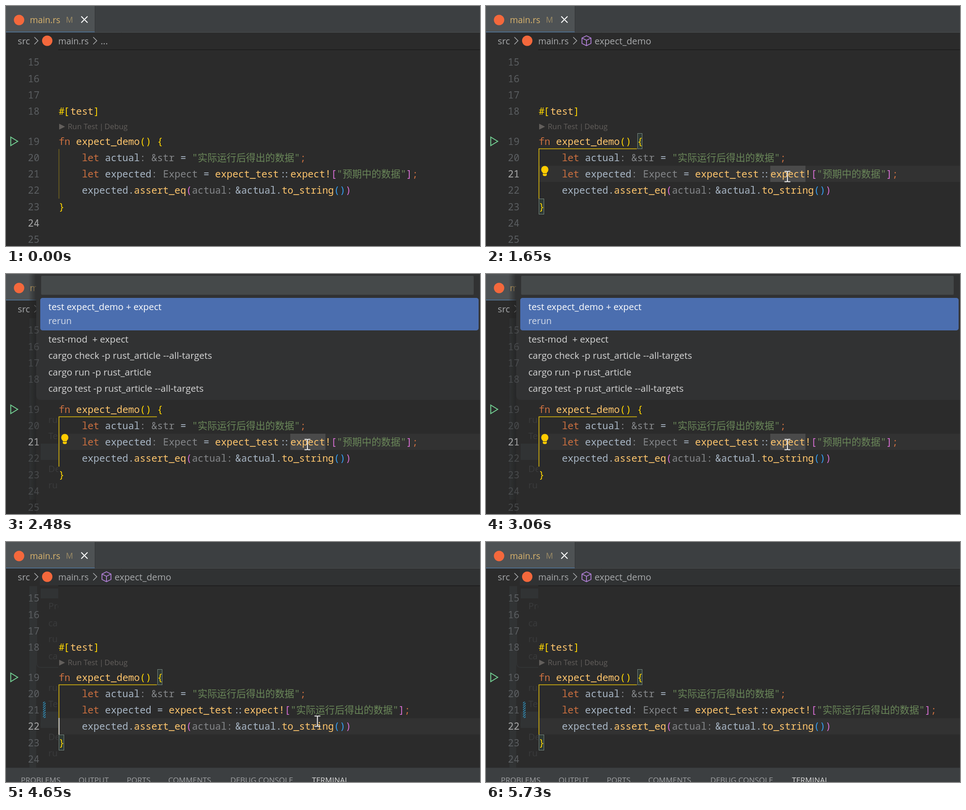
Recreate the animation shown at these times as an HTML page. Size 1052 by 532 pixels, loop 5830 ms.

```html
<!DOCTYPE html>
<html lang="zh-CN">
<head>
<meta charset="utf-8">
<title>Expect test demo</title>
<style>
html, body { margin: 0; width: 100%; height: 100%; overflow: hidden; background: #2b2b2b; }
svg { display: block; width: 100vw; height: 100vh; }
text { white-space: pre; }
.ui { font: 20.2px "Open Sans", "Noto Sans", sans-serif; fill: #d6d6d6; }
.code { font: 300 21.43px "Noto Sans Mono", "Noto Sans CJK SC", "Noto Sans CJK JP", "Noto Sans CJK", monospace; fill: #a9b7c6; }
.crumb { fill: #a9abad; }
.lens { font-size: 16.8px; fill: #635f5c; }
.tabs { font-size: 17px; fill: #a0a2a4; }
.runs { font-size: 20.6px; }
.line { fill: none; stroke-width: 2; }
.nums { fill: #5b5e61; }
.cur { fill: #a4a4a4; }
.k { fill: #cc7040; }
.f { fill: #ffc66d; }
.m { fill: #ffc66d; font-weight: 400; }
.h { fill: #85878a; }
.s { fill: #6a8759; }
.g { fill: #ffd700; }
.p { fill: #da70d6; }
.b { fill: #359ff4; }
.w { fill: #fff; }

/* each class shows its element during one part of the loop */
.before, .after, .crumbs0, .crumbs1, .row21, .row22, .bulb, .word, .caret21, .caret22,
.match, .cmds, .hover, .runs, .typing, .nums, .old, .fresh, .final,
.hatch, .panel, .trace, .hand, .beam { animation: 5830ms step-end infinite; }
.path { animation: path 5830ms linear infinite; }

.before { animation-name: before; }
.after { animation-name: after; }
.crumbs0 { animation-name: crumbs0; }
.crumbs1 { animation-name: crumbs1; }
.row21 { animation-name: row21; }
.row22 { animation-name: row22; }
.bulb { animation-name: bulb; }
.word { animation-name: word; }
.caret21 { animation-name: caret21; }
.caret22 { animation-name: caret22; }
.match { animation-name: match; }
.cmds { animation-name: cmds; }
.hover, .hand { animation-name: hover; }
.runs { animation-name: runs; }
.typing { animation-name: typing; }
.nums { animation-name: nums; }
.old { animation-name: old; }
.fresh { animation-name: fresh; }
.final { animation-name: final; }
.hatch { animation-name: hatch; }
.panel { animation-name: panel; }
.trace { animation-name: trace; }
.beam { animation-name: beam; }

@keyframes before { 0% { opacity: 1 } 18.52%, 100% { opacity: 0 } }
@keyframes after { 0% { opacity: 0 } 18.52%, 100% { opacity: 1 } }
@keyframes crumbs0 { 0% { opacity: 1 } 19.72%, 100% { opacity: 0 } }
@keyframes crumbs1 { 0% { opacity: 0 } 19.72%, 100% { opacity: 1 } }
@keyframes row21 { 0% { opacity: 0 } 18.52% { opacity: 1 } 71.69%, 100% { opacity: 0 } }
@keyframes row22 { 0% { opacity: 0 } 71.69%, 100% { opacity: 1 } }
@keyframes bulb { 0% { opacity: 0 } 23.67% { opacity: 1 } 71.69%, 100% { opacity: 0 } }
@keyframes word { 0% { opacity: 0 } 27.1% { opacity: 1 } 71.69%, 100% { opacity: 0 } }
@keyframes caret21 { 0% { opacity: 0 } 18.52% { opacity: 1 } 27.1% { opacity: 0 } 59% { opacity: 1 } 71.69%, 100% { opacity: 0 } }
@keyframes caret22 { 0% { opacity: 0 } 71.69% { opacity: 1 } 90.05%, 100% { opacity: 0 } }
@keyframes match { 0% { opacity: 0 } 18.52% { opacity: 1 } 32.24% { opacity: 0 } 59%, 100% { opacity: 1 } }
@keyframes cmds { 0% { opacity: 0 } 32.24% { opacity: 1 } 42.53%, 100% { opacity: 0 } }
@keyframes hover { 0% { opacity: 0 } 33.1% { opacity: 1 } 42.53%, 100% { opacity: 0 } }
@keyframes runs { 0% { opacity: 0 } 42.53% { opacity: 1 } 57.97%, 100% { opacity: 0 } }
@keyframes typing { 0% { opacity: 0 } 43.73% { opacity: 1 } 52.48%, 100% { opacity: 0 } }
@keyframes nums { 0% { opacity: 1 } 32.24% { opacity: .6 } 57.97%, 100% { opacity: 1 } }
@keyframes old { 0% { opacity: 1 } 71.69%, 100% { opacity: 0 } }
@keyframes fresh { 0% { opacity: 0 } 71.69% { opacity: 1 } 95.19%, 100% { opacity: 0 } }
@keyframes final { 0% { opacity: 0 } 95.19%, 100% { opacity: 1 } }
@keyframes hatch { 0% { opacity: 0 } 76.5%, 100% { opacity: 1 } }
@keyframes panel { 0% { opacity: 0 } 63.8%, 100% { opacity: 1 } }
@keyframes trace { 0% { opacity: 0 } 42.53%, 100% { opacity: 1 } }
@keyframes beam { 0% { opacity: 0 } 4.8% { opacity: 1 } 33.1% { opacity: 0 } 42.53% { opacity: 1 } 86.79%, 100% { opacity: 0 } }
@keyframes path {
  0%, 4.8% { transform: translate(264px, 524px) }
  8.23% { transform: translate(400px, 497px) }
  10.29% { transform: translate(491px, 480px) }
  11.32% { transform: translate(549px, 478px) }
  12.69% { transform: translate(640px, 425px) }
  13.89% { transform: translate(676px, 386px) }
  16.12%, 76.5% { transform: translate(669px, 378px) }
  79.76% { transform: translate(691px, 397px) }
  81.47% { transform: translate(704px, 418px) }
  84.04% { transform: translate(699px, 448px) }
  85.76% { transform: translate(667px, 479px) }
  86.79%, 100% { transform: translate(475px, 526px) }
}
</style>
</head>
<body>
<svg viewBox="0 0 1052 532" preserveAspectRatio="none">
<defs>
  <linearGradient id="shade">
    <stop stop-color="#222" stop-opacity="0"/>
    <stop offset="1" stop-color="#222" stop-opacity=".7"/>
  </linearGradient>
  <pattern id="stripes" width="6" height="5" patternUnits="userSpaceOnUse">
    <path d="M-1 6L7 0M-1 1L1 -.5M5 6.5L7 5" stroke="#2f86ad" stroke-width="2"/>
  </pattern>
  <clipPath id="strip"><path d="M52 98H116V500H52z"/></clipPath>
  <g id="gear" fill="none" stroke="#dcdfe6" stroke-width="2">
    <circle r="8.3"/>
    <circle r="10.4" stroke-width="3" stroke-dasharray="4.08"/>
    <circle r="3.2"/>
  </g>
</defs>

<rect width="1052" height="532" fill="#2b2b2b"/>

<!-- faint remains left of the code after the list closes -->
<g class="trace">
  <path d="M75 60H1052V96H75z" fill="#303233"/>
  <path d="M52 98H67V500H52zM77 103H116V125H77zM77 376H116V412H77z" fill="#313334"/>
  <path d="M68 98V268Q68 278 78 278H116" class="line" stroke="#313334"/>
  <g class="ui" style="fill:#3a3b3c" clip-path="url(#strip)">
    <text x="94" y="149">Preferences</text>
    <text x="94" y="187">cargo</text>
    <text x="94" y="222">rust</text>
    <text x="94" y="260">cargo</text>
    <text x="94" y="330">rust</text>
    <text x="94" y="366">Terminal</text>
    <text x="94" y="439">Developer</text>
    <text x="94" y="475">rust</text>
  </g>
</g>

<!-- tab bar and breadcrumbs -->
<rect width="1052" height="58" fill="#3c3f41"/>
<rect width="197" height="58" fill="#4e5254"/>
<path d="M0 58.5H1052" stroke="#4b4e50"/>
<path d="M0 57.5H197" stroke="#4a7fb5"/>
<path d="M197.5 0V58" stroke="#323436"/>
<path d="M116 97H1052" stroke="#1f1f1f" stroke-width="2"/>
<circle cx="29" cy="31" r="11.5" fill="#f4683c"/>
<circle cx="91.5" cy="77" r="11.5" fill="#f4683c"/>
<path d="M167 23L181 37M181 23L167 37" class="line" stroke="#fff"/>
<path d="M63 69L71 77L63 85M193.500 69L201.500 77L193.500 85" class="line" stroke="#a9abad" style="stroke-width:1.6"/>
<g class="ui">
  <text x="53" y="38" style="font-size:19.3px;fill:#d9b36c">main.rs</text>
  <text x="133" y="37" style="font-size:17.5px;fill:#9a8a66">M</text>
  <text x="26" y="85" class="crumb">src</text>
  <text x="116" y="85" class="crumb" style="font-size:19.3px">main.rs</text>
  <text x="210" y="85" class="crumb crumbs0">...</text>
  <g class="crumbs1">
    <path d="M223 66L233 71V83L223 88L213 83V71zM213 71L223 76L233 71M223 76V88" class="line" stroke="#b180d7" style="stroke-width:1.8"/>
    <text x="241" y="85" class="crumb">expect_demo</text>
  </g>
</g>

<!-- marks behind the code -->
<rect class="row21" x="117" y="354" width="935" height="36" fill="#323232"/>
<rect class="row22" x="117" y="390.500" width="935" height="36" fill="#323232"/>
<rect class="word" x="631" y="354" width="78" height="36" fill="#4a4a4a"/>
<g class="match" fill="#2f3a36" stroke="#788a82">
  <rect x="336.5" y="282.5" width="10" height="34"/>
  <rect x="117.5" y="427.5" width="11" height="34"/>
</g>
<path class="before line" d="M117.500 317V427" stroke="#675a20"/>
<path class="after line" d="M335 316.500H117.500V427" stroke="#e0bd0c" style="stroke-width:1.6"/>
<path d="M10.500 290.500L26 300L10.500 309.500z" class="line" stroke="#73d093"/>
<path d="M118 261L131 267.500L118 274z" fill="#635f5c"/>
<g class="ui">
  <text class="lens" x="137" y="273">Run Test</text>
  <text class="lens" x="207" y="273">|</text>
  <text class="lens" x="218.5" y="273">Debug</text>
</g>

<!-- code -->
<g class="code">
  <text x="117" y="241" class="g">#<tspan dx="-2">[</tspan><tspan class="f" dx="2">test</tspan>]</text>
  <text x="117" y="307.500"><tspan class="k">fn</tspan> <tspan class="f">expect_demo</tspan><tspan class="g">() {</tspan></text>
  <text x="168.4" y="343.500"><tspan class="k">let</tspan> actual<tspan class="h">: &amp;str</tspan> = <tspan class="s">"实际运行后得出的数据"</tspan><tspan class="k">;</tspan></text>
  <text x="168.4" y="380"><tspan class="k">let</tspan> expected</text>
  <text x="322.7" y="380" class="old"><tspan class="h">: Expect</tspan> = <tspan class="m">expect_test</tspan><tspan dx="3">:</tspan><tspan dx="-5">:</tspan><tspan class="m" dx="2">expect!</tspan><tspan class="p">[</tspan><tspan class="s">"预期中的数据"</tspan><tspan class="p">]</tspan><tspan class="k">;</tspan></text>
  <text x="322.7" y="380" class="fresh"> = <tspan class="m">expect_test</tspan><tspan dx="3">:</tspan><tspan dx="-5">:</tspan><tspan class="m" dx="2">expect!</tspan><tspan class="p">[</tspan><tspan class="s">"实际运行后得出的数据"</tspan><tspan class="p">]</tspan><tspan class="k">;</tspan></text>
  <text x="322.7" y="380" class="final"><tspan class="h">: Expect</tspan> = <tspan class="m">expect_test</tspan><tspan dx="3">:</tspan><tspan dx="-5">:</tspan><tspan class="m" dx="2">expect!</tspan><tspan class="p">[</tspan><tspan class="s">"实际运行后得出的数据"</tspan><tspan class="p">]</tspan><tspan class="k">;</tspan></text>
  <text x="168.4" y="416">expected.<tspan class="m">assert_eq</tspan><tspan class="p">(</tspan><tspan class="h">actual:</tspan><tspan dx="6.5">&amp;actual.</tspan><tspan class="m">to_string</tspan><tspan class="b">()</tspan><tspan class="p">)</tspan></text>
  <text x="117" y="452.500" class="g">}</text>
</g>
<g class="bulb" fill="#ffcc00">
  <circle cx="130.500" cy="362.500" r="8"/>
  <path d="M126 366H135V374Q135 377 130.500 377Q126 377 126 374z"/>
  <path d="M126 371.500H135" stroke="#323232"/>
</g>
<rect class="caret21" x="668.5" y="354" width="2.500" height="36" fill="#bbb"/>
<rect class="caret22" x="116.5" y="390" width="2.500" height="37" fill="#bbb"/>
<rect class="hatch" x="82" y="354" width="6" height="36" fill="url(#stripes)"/>

<!-- command list -->
<g class="cmds ui">
  <path d="M50 0H67V532H50z" fill="url(#shade)"/>
  <path d="M67 0H1052V532H67z" fill="#313233"/>
  <path d="M67 59H1052V96H67z" fill="#2d2e2f"/>
  <text x="241" y="85" style="fill:#242526">expect_demo</text>
  <path d="M79 0H1038V3Q1038 5 1036 5H81Q79 5 79 3z" fill="#45494a"/>
  <rect x="76" y="13" width="973" height="36" rx="5" fill="#4b6eaf"/>
  <rect class="hover" x="76" y="376" width="973" height="36" rx="5" fill="#4b6eaf"/>
  <text x="94" y="39.500" class="w">rust-analyzer: Run</text>
  <text x="986" y="39.500" class="w" text-anchor="end">recently used</text>
  <text x="94" y="75.500">Developer: Reload Window</text>
  <text x="94" y="112">rust-analyzer: Expand macro recursively at caret</text>
  <text x="94" y="148">Preferences: Open User Settings (JSON)</text>
  <text x="94" y="184.500">Go: Install/Update Tools</text>
  <text x="94" y="220.500">rust-analyzer (debug command): Show Syntax Tree</text>
  <text x="94" y="257">rust-analyzer: Open Walkthrough</text>
  <text x="94" y="293">Welcome: Open Walkthrough...</text>
  <text x="94" y="329.500">rust-analyzer (debug command): View Hir</text>
  <text x="94" y="365.500">Terminal: Select Default Profile</text>
  <text x="94" y="402">Terminal: Detach Session</text>
  <text x="94" y="438">Developer: Inspect Editor Tokens and Scopes</text>
  <text x="94" y="474.500">rust-analyzer: Start server</text>
  <text x="94" y="510.500">clangd: Restart language server</text>
  <text x="94" y="545.500">clangd: Download language server</text>
  <use href="#gear" x="1009" y="31"/>
  <use href="#gear" class="hover" x="1009" y="393"/>
</g>

<!-- run list -->
<g class="ui runs">
  <path d="M50 0H67V532H50z" fill="url(#shade)"/>
  <path d="M67 0H1052V279H77Q67 279 67 269z" fill="#313233"/>
  <rect x="78" y="4" width="960" height="42" rx="2" fill="#45494a"/>
  <rect class="typing" x="89" y="11" width="1.500" height="28" fill="#ccc"/>
  <rect x="76" y="53" width="973" height="72" rx="5" fill="#4b6eaf"/>
  <text x="94" y="79.500" class="w" style="font-size:20.3px">test expect_demo + expect</text>
  <text x="94" y="111" style="font-size:20px;fill:#d3dbe9">rerun</text>
  <text x="94" y="152">test-mod  + expect</text>
  <text x="94" y="188">cargo check -p rust_article --all-targets</text>
  <text x="94" y="224.500">cargo run -p rust_article</text>
  <text x="94" y="260.500">cargo test -p rust_article --all-targets</text>
</g>

<!-- line numbers -->
<g class="code">
  <g class="nums">
    <text x="48.600" y="132">15</text>
    <text x="48.600" y="168.500">16</text>
    <text x="48.600" y="204.500">17</text>
    <text x="48.600" y="241">18</text>
    <text x="48.600" y="307.500">19</text>
    <text x="48.600" y="343.500">20</text>
    <text x="48.600" y="380">21</text>
    <text x="48.600" y="416">22</text>
    <text x="48.600" y="452.500">23</text>
    <text x="48.600" y="488.500">24</text>
    <text x="48.600" y="524.500">25</text>
  </g>
  <text x="48.600" y="488.500" class="cur before">24</text>
  <text x="48.600" y="380" class="cur row21">21</text>
  <text x="48.600" y="416" class="cur row22">22</text>
</g>

<!-- bottom panel -->
<g class="panel ui">
  <rect y="500" width="1052" height="32" fill="#3c3f41"/>
  <path d="M0 500.500H1052" stroke="#343638"/>
  <g class="tabs">
    <text x="33" y="533.500">PROBLEMS</text>
    <text x="161" y="533.500">OUTPUT</text>
    <text x="268" y="533.500">PORTS</text>
    <text x="360" y="533.500">COMMENTS</text>
    <text x="498" y="533.500">DEBUG CONSOLE</text>
    <text x="679" y="533.500" fill="#dcdcdc">TERMINAL</text>
  </g>
</g>

<!-- pointers -->
<path class="hand" d="M664 396V381a3 3 0 0 1 6 0v8l8 2q3 1 3 4v6l-3 8h-11l-8-11q-2-3 1-4 2-1 4 2z" fill="#fff" stroke="#111" stroke-width="1.200"/>
<g class="beam">
  <path class="path line" d="M-6.500 -11.500H-2Q0 -11.500 0 -9.500V9.500Q0 11.500 -2 11.500H-6.500M6.500 -11.500H2Q0 -11.500 0 -9.500M0 9.500Q0 11.500 2 11.500H6.500" stroke="#f0f0f0"/>
</g>
</svg>
</body>
</html>
```
